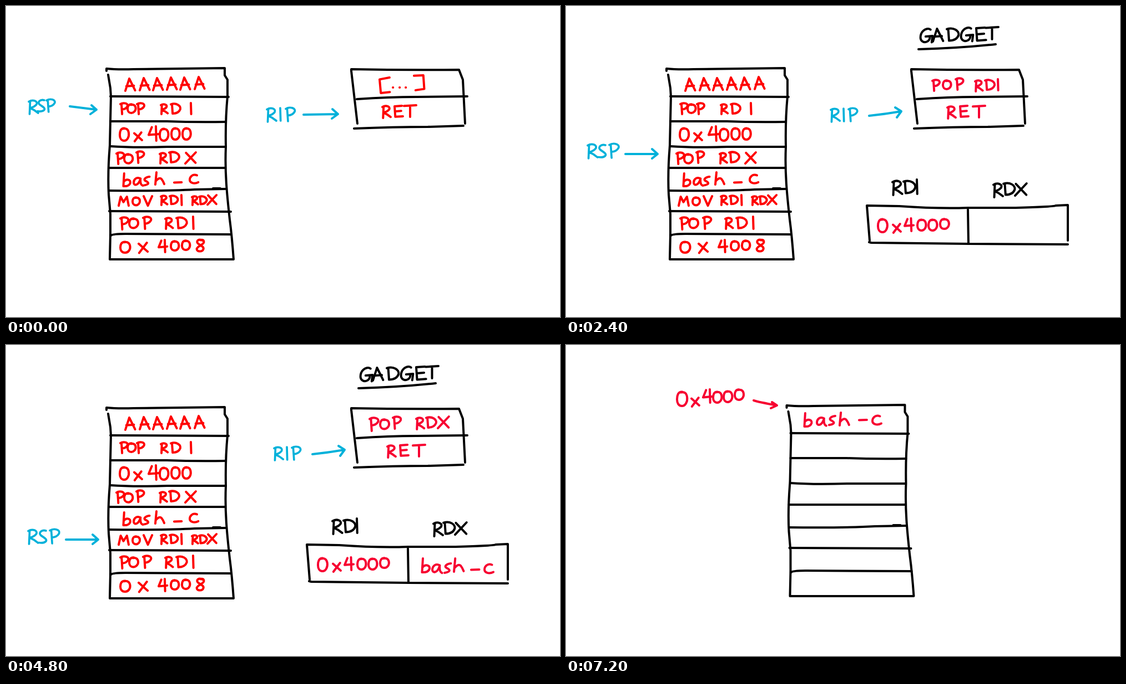
Animation, 998 px wide and 561 px high, one loop 8000 ms. Source, as an HTML page:

```html
<!DOCTYPE html>
<html lang="en">
<head>
<meta charset="utf-8">
<title>Stack and gadget walk-through</title>
<style>
  html, body { margin: 0; width: 100%; height: 100%; overflow: hidden; background: #fff; }
  svg { display: block; width: 998px; height: 561px; }
  path { fill: none; stroke-linecap: round; stroke-linejoin: round; vector-effect: non-scaling-stroke; }
</style>
</head>
<body>
<svg id="stage" viewBox="0 0 998 561"></svg>
<script>
const NS = 'http://www.w3.org/2000/svg';
const BLACK = '#000', RED = '#fe0000', ROSE = '#f70030', BLUE = '#00b1da';
const STEP = 1200, LOOP = 8000;
const parts = [];

// Pen strokes per letter; a capital is about ten units tall
const PEN = {
  A: 'M0 10L3.2 0L8 9.6M.8 6.2L7 5.8',
  C: 'M6 .6C2-1 0 2 0 4S3 8 6.5 6.6',
  D: 'M1 .4L1.6 9M0 .7C5-1 9 2 8.5 5Q7 9 1.6 9',
  E: 'M6 0L0 .4L.6 9L6.8 8.6M.5 4.6L5.4 4.2',
  G: 'M7.2.6C5-1 1 1 .3 5C-.3 9 3 10 5 8.8Q6.6 8 6.8 5.4M3.8 5.4L8.6 5L8 9.4',
  I: 'M0 0L.3 10',
  M: 'M0 9L2 0L4.8 5.4L8.2 0L10 9',
  O: 'M4 .2C1-.2 0 2 0 4.2S1.4 8 3.4 8S7.5 6 7.3 3.6S5.4 0 3 .6',
  P: 'M1 1L1.6 10M0 1C3-.8 7.4.4 6.4 3Q5 5.6 1.4 5.8',
  R: 'M1 .8L.6 10M0 1C3-.8 6.8.6 5.6 3Q4 5 .9 5.6Q4 6.8 6.8 9.2',
  S: 'M5.2.4C2-.6-.4 2 1.4 3.6S6.6 6.4 5 8.2Q3.4 9.6 0 9',
  T: 'M0 .6L10 0M5 .4L5 9.6',
  V: 'M0 0L4 9L8 0',
  X: 'M.6.4L8.8 9M9 0L0 9.6',
  x: 'M0 .8L7 7M6.4 0L.4 8',
  0: 'M3.6.2C.6 0 0 3 0 5.4S1 10 3.4 10S7.4 7 7 4S5 0 2.6.6',
  4: 'M2.2.6L0 6L7 5.4M5 0L5.3 10',
  8: 'M6 1C3-1 .4 1.4 2 3.2S7.4 5.6 6.6 8S1.2 10.4 1.2 8S6.8 4.4 7 2.4S5.4 0 4.4.6',
  a: 'M5.4 1C2-.8 0 2 0 4.2S3.4 7.2 5.3 1.4Q5 5.8 7 6.5',
  b: 'M.8 0L.2 10M.4 6.6C2.4 4 6 4.6 5.6 7.4Q4.6 10.4.2 10',
  c: 'M5.4.6C2-.8 0 2 0 4S3 7.6 6.4 5.8',
  h: 'M.9 0L0 9.6M.3 7Q3 3.6 4.8 5.2Q6 6.6 7 9.2',
  s: 'M4.6 0C1.6.2-.6 2.2 1.4 3.2S5.6 5.8 0 6.8',
  _: 'M0 .2L5.8 0',
  '[': 'M6.4 0L0 1.2L.8 10L6.6 9.4',
  ']': 'M0 .3L6 0L6.6 8.8L1 9.6',
  '.': 'M0 0h.1',
  ',': 'M.8 0L0 4'
};

function node(tag, attrs, parent) {
  const el = document.createElementNS(NS, tag);
  for (const key in attrs) el.setAttribute(key, attrs[key]);
  return parent.appendChild(el);
}

// A group shown only in the listed steps
function part(steps) {
  const g = node('g', {}, stage);
  parts.push({ g, steps });
  return g;
}

function line(g, d, color = BLACK, width = 4) {
  node('path', { d, stroke: color, 'stroke-width': width }, g);
}

// Letters are "glyph:x,y[,size[,width factor]]"
function write(g, color, size, letters, width = 4) {
  const items = letters.split(' ');
  const word = node('g', { role: 'img', 'aria-label': items.map(i => i[0]).join('') }, g);
  for (const item of items) {
    const [x, y, h = size, k = 1] = item.slice(2).split(',').map(Number);
    node('path', {
      d: PEN[item[0]], stroke: color, 'stroke-width': width,
      transform: `translate(${x} ${y}) scale(${h / 10 * k} ${h / 10})`
    }, word);
  }
}

function stackBox(g) {
  line(g, 'M181 117L181 113Q200 115 230 114L394 112V125L399 133L399 163Q395 205 396 254C394 300 398 340 403 385Q407 415 410 457');
  line(g, 'M184 124L188 148L189 163L187 252Q183 300 185 340L188 375L188 412L187 457L409 457');
  line(g, 'M188 163L401 164M188 208L290 208Q340 210 396 209M188 253Q230 256 290 254L395 254');
  line(g, 'M185 292L394 292M186 333Q290 334 340 331L395 330M373 329L386 329M186 370L405 371M189 414Q192 411 215 411L406 412');
}

const stage = document.getElementById('stage');
const before = [0], walk = [1, 2, 3, 4, 5], both = [0, ...walk], last = [6];

// Stack
const stack = part(both);
stackBox(stack);
write(stack, RED, 22, 'A:215,131 A:241,130 A:265,130 A:290,129 A:314,129 A:340,128');
write(stack, RED, 20, 'P:206,175 O:219,177 P:236,175 R:279,177,18 D:297,176 I:333,175');
write(stack, RED, 22, '0:205,220,23 x:231,228,20 4:257,217,26 0:277,221 0:298,220,21 0:318,220,21');
write(stack, RED, 21, 'P:199,264 O:213,267 P:235,262 R:277,265,19 D:294,263 X:323,264');
write(stack, RED, 23, 'b:211,302 a:230,309 s:248,308 h:269,300 _:303,318 c:331,304,24');
write(stack, RED, 18, 'M:203,344 O:228,345 V:248,343,19 R:279,342,17 D:295,342,17 I:316,341 R:335,343,16 D:348,343,16 X:363,341');
write(stack, RED, 22, 'P:206,381 O:222,383 P:247,380 R:287,382,20 D:307,381 I:337,380');
write(stack, RED, 20, '0:206,425,20,1.25 x:239,427,23 4:275,422,22 0:297,424,17,1.2 0:317,423,17,1.2 8:341,421,22');

// Gadget box
const box = part(both);
line(box, 'M622 118L622 114Q720 116 816 115L823 133L827 212M622 117L633 212');
line(box, 'M632 168Q690 164 740 164L831 163M627 221Q700 218 760 218L824 216');

const start = part(before);
write(start, RED, 28, '[:673,129 .:697,147 .:709,147 .:720,147 ]:735,125');
write(start, RED, 22, 'R:678,180 E:700,180 T:717,179');
write(start, BLUE, 25, 'R:41,170 S:57,169,23 P:73,168,23', 3.7);
line(start, 'M115 181L163 187M154 179L163 187L152 195', BLUE);
write(start, BLUE, 25, 'R:470,184 I:494,184,23 P:504,183', 3.7);
line(start, 'M536 196L598 195M588 186L598 195L587 203', BLUE);

// Title, registers and fixed RET
const scene = part(walk);
write(scene, BLACK, 26, 'G:638,41 A:661,41,23 D:686,40,25 G:711,39 E:739,39 T:756,38,23');
line(scene, 'M635 78Q710 76 774 69');
write(scene, ROSE, 22, 'R:687,181 E:710,180 T:733,180');
write(scene, BLACK, 26, 'R:588,315 D:608,315,25 I:632,313');
write(scene, BLACK, 25, 'R:770,320 D:788,319,24 X:809,320,23');
line(scene, 'M547 423L542 360L600 361Q670 366 724 364L810 364Q880 362 882 360L904 359L904 423');
line(scene, 'M724 367L725 429M546 426L550 427L725 429L904 430');

const rdi = part([2, 3, 4, 5]);
write(rdi, ROSE, 20, '0:562,384,24 x:589,393 4:610,383,23 0:633,385,20,1.1 0:653,385,20,1.1 0:674,384,18,1.25');
const rdx = part([4, 5]);
write(rdx, ROSE, 25, 'b:749,385 a:768,395 s:790,394 h:807,385 _:838,405 c:862,395');

write(part([1, 2]), ROSE, 20, 'P:660,133 O:679,134 P:702,130,21 R:737,134 D:755,133 I:778,132');
write(part([3, 4]), ROSE, 22, 'P:655,131,24 O:674,134 P:697,129 R:739,131,21 D:757,130,21 X:778,129');
write(part([5]), ROSE, 18, 'M:634,136,21 O:657,138,19 V:674,135,20 [:694,131,29,.45 R:705,134 D:717,134,18,.85 I:737,133 ]:741,131,27,.45 ,:756,148,22 R:769,134,17 D:781,134,17,.85 X:796,133');

// Pointers hop from row to row
const rsp = part(walk), rip = part(walk);
write(rsp, BLUE, 26, 'R:45,212 S:64,213,25 P:84,211', 3.7);
line(rsp, 'M113 230L171 230M161 221L171 230L161 238', BLUE);
write(rip, BLUE, 24, 'R:472,130 I:495,130,23 P:504,129', 3.7);
line(rip, 'M541 143Q570 140 599 135M588 128L599 135L591 146', BLUE);
const rspAt = [[0, 0], [0, 0], [-6, 37], [-4, 82], [-5, 121], [-2, 161]];
const ripAt = [[0, 0], [0, 0], [5, 55], [10, 7], [11, 54], [10, 7]];

// Memory after the write
const memory = part(last);
stackBox(node('g', { transform: 'translate(216.5 -4)' }, memory));
write(memory, ROSE, 20, '0:200,84,26 x:226,95 4:247,80,24 0:265,84,20,1.1 0:284,83,20,1.1 0:304,80,19,1.2');
line(memory, 'M338 100Q347 103 380 109M371 103L380 109L369 114', ROSE);
write(memory, ROSE, 24, 'b:429,123 a:452,130 s:474,128 h:493,122 _:528,135 c:552,127,25');

let shown = -1;
function draw() {
  const step = Math.floor(performance.now() % LOOP / STEP);
  if (step !== shown) {
    shown = step;
    for (const { g, steps } of parts) g.style.display = steps.includes(step) ? '' : 'none';
    if (rspAt[step]) {
      rsp.setAttribute('transform', `translate(${rspAt[step]})`);
      rip.setAttribute('transform', `translate(${ripAt[step]})`);
    }
  }
  requestAnimationFrame(draw);
}
draw();
</script>
</body>
</html>
```
